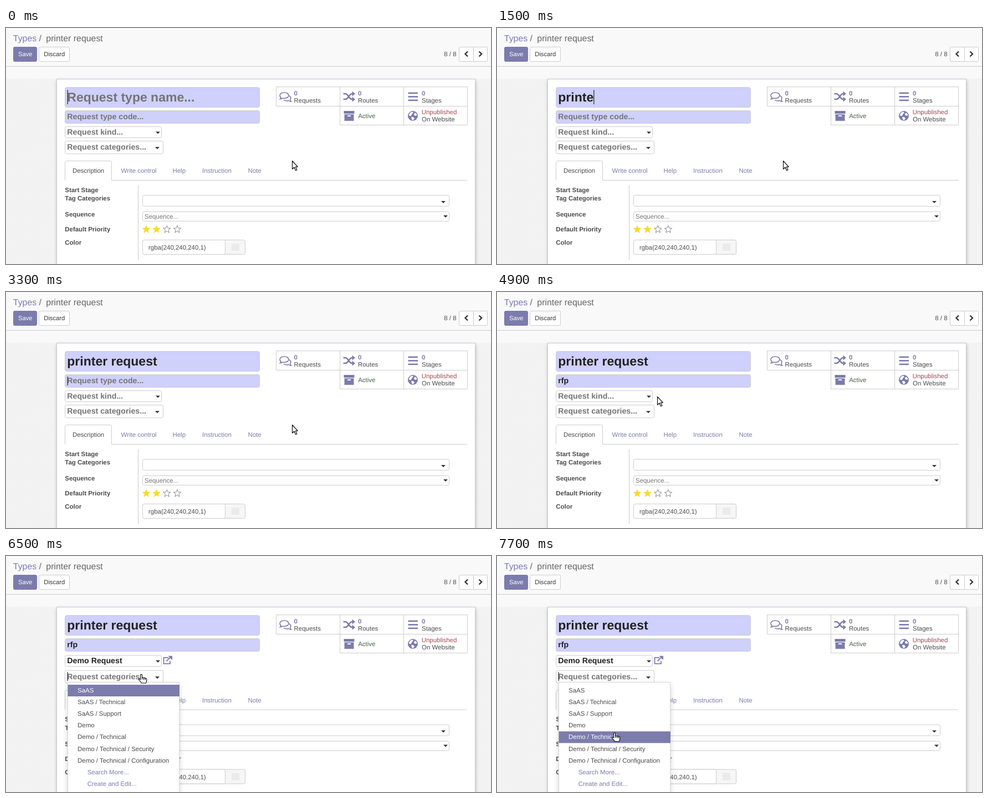
An HTML page that plays this animation: 875 by 427 pixels, repeating every 8000 ms.

```html
<!DOCTYPE html>
<html lang="en">
<head>
<meta charset="utf-8">
<title>Request type form</title>
<style>
html, body { margin: 0; width: 100%; height: 100%; overflow: hidden; background: #f9f9f9; }
svg { display: block; width: 875px; height: 427px; }
text { font-family: "Liberation Sans", Arial, sans-serif; white-space: pre; text-rendering: geometricPrecision; }
</style>
</head>
<body>
<svg id="stage" viewBox="0 0 875 427"></svg>
<script>
const ACCENT = '#7c7bad', INK = '#4c4c4c', DARK = '#222', HINT = '#757575', LINE = '#ccc', FIELD = '#d0d0fc';

const text = (x, y, s, { size = 11.45, fill = INK, bold = false, id = '' } = {}) =>
  `<text ${id && `id="${id}"`} x="${x}" y="${y}" font-size="${size}" fill="${fill}"${bold ? ' font-weight="700"' : ''}>${s}</text>`;
const box = (x, y, w, h, { fill = '#fff', stroke = LINE, r = 3 } = {}) =>
  `<rect x="${x + .5}" y="${y + .5}" width="${w}" height="${h}" rx="${r}" fill="${fill}" stroke="${stroke}"/>`;
const rect = (x, y, w, h, fill) => `<rect x="${x}" y="${y}" width="${w}" height="${h}" fill="${fill}"/>`;
const line = (d, stroke = LINE, w = 1) => `<path d="${d}" fill="none" stroke="${stroke}" stroke-width="${w}"/>`;
const shape = (d, fill = ACCENT) => `<path d="${d}" fill="${fill}"/>`;
const toggle = (x, y) => shape(`M${x - 4} ${y - 2}h8l-4 4z`, '#333');
const label = (y, s) => text(106.3, y, s, { bold: true });
const FIELD_X = 110.3;
const big = (id, y, s, fill = HINT, size = 14.2) => text(FIELD_X, y, s, { id, fill, size, bold: true });

function star(cx, cy, filled) {
  const points = Array.from({ length: 10 }, (_, i) => {
    const a = -Math.PI / 2 + i * Math.PI / 5, r = i % 2 ? 3.1 : 7;
    return `${(cx + r * Math.cos(a)).toFixed(2)},${(cy + r * Math.sin(a)).toFixed(2)}`;
  }).join(' ');
  return `<polygon points="${points}" fill="${filled ? '#fbdc22' : '#fff'}" stroke="${filled ? '#f2d021' : '#888'}" stroke-width="${filled ? .6 : 1}" stroke-linejoin="round"/>`;
}

const header = rect(0, 0, 875, 70, '#f9f9f9') + line('M0 69.5H875', '#c9c9c9') +
  text(12.8, 24, 'Types', { size: 15.9, fill: ACCENT }) + text(59.5, 24, '/', { size: 15.9, fill: '#666' }) +
  text(72.3, 24, 'printer request', { size: 15.9, fill: '#666' }) +
  box(13, 34, 42, 26, { fill: ACCENT, stroke: ACCENT, r: 2 }) + text(22, 51.3, 'Save', { size: 11.2, fill: '#fff' }) +
  box(59, 34, 55, 26, { r: 2 }) + text(68.3, 51.3, 'Discard', { size: 11.2, fill: '#333' }) +
  text(790.3, 51.3, '8 / 8') + box(817, 34, 51, 26, { r: 2 }) + line('M843.5 35V60') +
  line('M833 42.5l-4.5 4.5 4.5 4.5M853.5 42.5l4.5 4.5-4.5 4.5', '#333', 2.4);

const sheet = rect(0, 92, 875, 335, 'url(#weave)') +
  `<rect x="92" y="95" width="755" height="360" fill="#000" opacity=".28" filter="url(#soft)"/>` +
  box(91, 92, 755, 360, { stroke: '#c8c8d3', r: 0 });

const icons =
  `<g fill="#fff" stroke="${ACCENT}" stroke-width="1.6">
    <path d="M509 122c4 1 6 4 4 7c-.5 1 .5 2.500 1.500 4c-2.500 0-3.500-1-4.500-1.700c-3 .8-7 .4-9-1.300"/>
    <path d="M502 116.700c4.500 0 8 2.300 8 5.300s-3.500 5.300-8 5.300c-1 0-2-.1-3-.4c-1.200 1-2.500 1.600-4.500 1.700c1-1 1.600-1.700 1.700-2.700c-1.400-1-2.200-2.400-2.200-3.900c0-3 3.500-5.300 8-5.300z"/></g>` +
  line('M608.5 119h3.500c6 0 6.500 10 12.500 10h1M608.5 129h3.500c6 0 6.500-10 12.500-10h1', ACCENT, 2.7) +
  shape('M624.500 114.500l5.500 4.500-5.500 4.500zM624.500 124.500l5.500 4.500-5.500 4.500z') +
  [116.5, 123, 129.5].map(y => rect(725.5, y, 17.5, 2.6, ACCENT)).join('') +
  rect(609.5, 150, 19, 5, ACCENT) + rect(610.5, 156.2, 17, 11.8, ACCENT) + rect(616, 158, 6, 2, '#fff') +
  `<circle cx="734" cy="159" r="9" fill="${ACCENT}"/>` +
  shape('M729 153l4-1.500 2 1.500-2.500 2.500-1.500 3-2 1-2.500-2zM736 155l3-1.500 2.500 4-2 1.500-3-1zM731 161l3.500 0 2.500 2.500-3 4-2-2.500z', '#fff');

const stat = (x, y, s) => text(x, y, '0', { fill: ACCENT, bold: true }) + text(x, y + 13.2, s);
const stats = line('M487.500 106.500H832.500V175.500H602.500V106.500M602.500 141.500H487.500V106.500M602.500 141.500H832.500M717.500 106.500V175.500') +
  icons + stat(519.6, 121.6, 'Requests') + stat(635, 121.6, 'Routes') + stat(750, 121.6, 'Stages') +
  text(635.2, 163, 'Active', { fill: '#40683f' }) + text(749.7, 155.900, 'Unpublished', { fill: '#a04a4f' }) +
  text(750, 169, 'On Website');

const tabs = [[207.6, 'Write control'], [300.5, 'Help'], [354, 'Instruction'], [436.5, 'Note']];
const lower = line('M106.500 275.500V244a3 3 0 0 1 3-3.500H187.500a3 3 0 0 1 3 3V275.500H832') +
  text(120, 262, 'Description') + tabs.map(([x, s]) => text(x, 262, s, { fill: ACCENT })).join('') +
  label(296.5, 'Start Stage') + label(312.3, 'Tag Categories') + label(341.3, 'Sequence') +
  label(368, 'Default Priority') + label(392, 'Color') + line('M238.500 285V420') +
  box(246, 302, 553, 20) + toggle(789, 315) + box(246, 332, 553, 17) + toggle(793, 341) +
  text(250, 345, 'Sequence...', { fill: HINT }) +
  [253, 271.5, 290.3, 309].map((x, i) => star(x, 364.5, i < 2)).join('') +
  box(246, 383, 185, 26, { fill: '#f6f6f6' }) + box(246, 383, 149, 26) +
  text(257, 401, 'rgba(240,240,240,1)') + rect(407, 390, 14, 13, '#ebebeb');

const form = box(106, 107, 351, 36, { fill: FIELD }) + big('name', 133, '', DARK, 23) +
  box(106, 149, 351, 23, { fill: FIELD }) + big('code', 165, '', DARK) +
  `<g id="kindRow">${box(106, 178, 174, 20)}${toggle(274, 189.5)}${big('kind', 192.700, '')}
    <g id="link">${line('M293 182.500H284.500V193.500H296V188.500', ACCENT, 1.8)}${line('M289.500 189L298 180.500', ACCENT, 2)}${shape('M292.500 179.500H300V187z')}</g></g>` +
  `<g id="lower"><g>${box(106, 204, 177, 23)}${toggle(273, 217.3)}${big('category', 220, 'Request categories...')}</g>${lower}</g>`;

const categories = ['SaAS', 'SaAS / Technical', 'SaAS / Support', 'Demo', 'Demo / Technical',
  'Demo / Technical / Security', 'Demo / Technical / Configuration', 'Search More...', 'Create and Edit...'];
const ROW = 21.1, LIST_TOP = 232.9;

const menus = `<g id="kindMenu" filter="url(#drop)">${box(106, 203, 174, 47, { r: 0, stroke: '#d8d8d8' })}${rect(107, 204, 173.500, 20.700, ACCENT)}
    ${text(124.500, 218, 'Demo Request', { fill: '#fff' })}${text(142, 239, 'Create and Edit...', { fill: ACCENT })}</g>
  <g id="categoryMenu" filter="url(#drop)">${box(111, 228, 201, 210, { r: 0, stroke: '#d8d8d8' })}
    <rect id="highlight" x="111.500" width="201.500" height="${ROW}" fill="${ACCENT}"/>
    ${categories.map((s, i) => text(i < 7 ? 129.1 : 146.7, LIST_TOP + 14.1 + i * ROW, s, { id: 'row' + i })).join('')}</g>`;

const pointers = `<g stroke="#111" stroke-width="1.200" fill="#fff" stroke-linejoin="round">
  <path id="arrow" d="M.500 .500V15.300L4 12L6.500 17.800L8.900 16.700L6.400 11.200H10.300Z"/>
  <path id="hand" d="M-1.500 1c0-1.800 3-1.800 3 0V6c.5-1 2.800-.8 3 .5c.5-1 2.600-.7 2.800.6c.6-.8 2.400-.4 2.400 1V11.500c0 1.500-1 2-1.200 4H.500c-.6-2-3-3.500-4.800-6c-.8-1.600.9-2.400 2.800-.5ZM1.500 6v3M4.500 6.500v3M7.300 7.200v2.500"/></g>`;

const stage = document.getElementById('stage');
stage.innerHTML = `<defs>
  <pattern id="weave" width="4" height="4" patternUnits="userSpaceOnUse" patternTransform="scale(.885)">
    <rect width="4" height="4" fill="#f9f9f9"/><path d="M0 0h1v1h-1zM1 1h1v1h-1zM2 2h1v1h-1zM3 3h1v1h-1zM2 0h1v1h-1zM0 2h1v1h-1z" fill="#e8e8e8"/></pattern>
  <filter id="soft" x="-5%" y="-5%" width="110%" height="110%"><feGaussianBlur stdDeviation="3"/></filter>
  <filter id="drop" x="-10%" y="-10%" width="120%" height="130%"><feDropShadow dx="0" dy="4" stdDeviation="4" flood-opacity=".18"/></filter>
  </defs>` + rect(0, 0, 875, 427, '#f9f9f9') + header + sheet + stats + form +
  '<rect id="caret" width="1.200" fill="#222"/>' + menus + pointers;

const el = id => document.getElementById(id);
const show = (id, on) => el(id).setAttribute('display', on ? 'inline' : 'none');
const move = (id, x, y) => el(id).setAttribute('transform', `translate(${x} ${y})`);
function write(id, value, hint) {
  el(id).textContent = value || hint;
  el(id).setAttribute('fill', value ? DARK : HINT);
}

const NAME_KEYS = [800, 900, 1100, 1200, 1400, 1500, 1600, 1700, 1800, 1900, 2000, 2300, 2400, 2500, 2600];
const CODE_KEYS = [3800, 3900, 4000];
const typed = (s, keys, t) => s.slice(0, keys.filter(k => k <= t).length);

// Pointer path: time, x, y
const PATH = [[4500, 516, 240], [4700, 425, 217], [4900, 289, 189], [5100, 268, 188], [5400, 252, 192],
  [5600, 252, 192], [5700, 247, 207], [5900, 245, 211], [6300, 245, 211], [6400, 244, 214.500],
  [6700, 244, 214.500], [7100, 232, 258], [7600, 212, 320]];
function pointerAt(t) {
  const i = PATH.findIndex(p => p[0] > t);
  if (i === 0) return PATH[0].slice(1);
  if (i < 0) return PATH[PATH.length - 1].slice(1);
  const [t0, x0, y0] = PATH[i - 1], [t1, x1, y1] = PATH[i], k = (t - t0) / (t1 - t0);
  return [x0 + (x1 - x0) * k, y0 + (y1 - y0) * k];
}

// Caret as [visible, x, y, height], following the focused field
function caretAt(t) {
  const endOf = id => FIELD_X + el(id).getComputedTextLength();
  if (t < 800) return [t < 100 || t >= 600, 110.6, 112, 26];
  if (t < 3300) return [t < 3200, endOf('name'), 112, 26];
  if (t < 3800) return [true, 110.6, 153, 16];
  if (t < 5500) return [t < 4600 || t >= 5100, endOf('code'), 153, 16];
  if (t < 6100) return [true, 110.6, 180, 16];
  if (t < 6400) return [true, endOf('kind'), 181, 16];
  return [t < 7000 || t >= 7500, 110.6, 210, 16];
}

function render(ms) {
  const t = Math.floor(ms / 100) * 100, picked = t >= 6100;
  write('name', typed('printer request', NAME_KEYS, t), 'Request type name...');
  write('code', typed('rfp', CODE_KEYS, t), 'Request type code...');
  write('kind', picked && 'Demo Request', 'Request kind...');
  show('link', picked);
  move('kindRow', 0, picked ? 1.3 : 0);
  move('lower', 0, picked ? 2.6 : 0);
  show('kindMenu', t >= 5500 && !picked);
  show('categoryMenu', t >= 6500);

  const [x, y] = pointerAt(t), overField = t >= 5000;
  show('arrow', !overField);
  show('hand', overField);
  move(overField ? 'hand' : 'arrow', x, y);

  const active = Math.max(0, Math.floor((y - LIST_TOP) / ROW));
  el('highlight').setAttribute('y', LIST_TOP + active * ROW);
  categories.forEach((_, i) => el('row' + i).setAttribute('fill', i === active ? '#fff' : i < 7 ? INK : ACCENT));

  const [on, cx, cy, h] = caretAt(t);
  show('caret', on);
  el('caret').setAttribute('x', cx);
  el('caret').setAttribute('y', cy);
  el('caret').setAttribute('height', h);
}

const start = performance.now();
function tick() {
  render((performance.now() - start) % 8000);
  requestAnimationFrame(tick);
}
tick();
</script>
</body>
</html>
```
